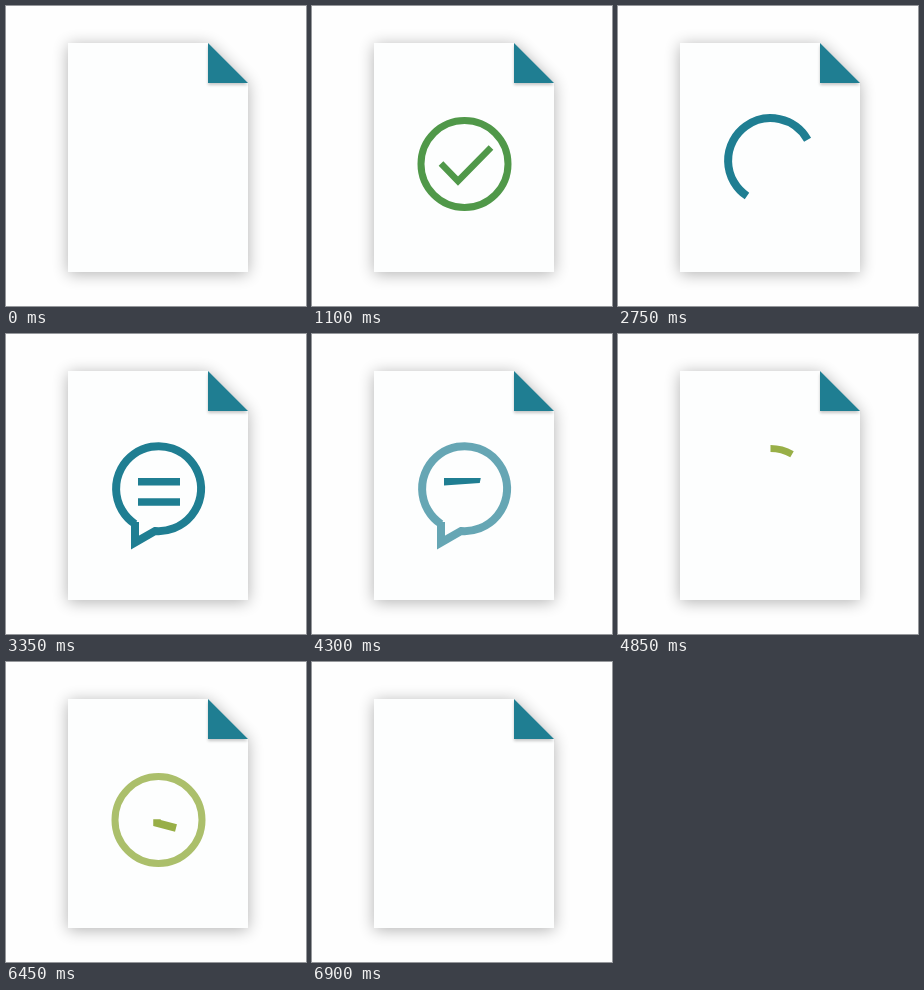
These frames come from a looping animation (300x300 px, 7150 ms). An HTML page:

```html
<!DOCTYPE html>
<html lang="en">
<head>
<meta charset="utf-8">
<title>Document status icons</title>
<style>
  html, body { margin: 0; width: 100%; height: 100%; overflow: hidden; background: #fefefe; }
  svg { display: block; width: 100%; height: 100%; }
  .icon path { fill: none; stroke: currentColor; stroke-miterlimit: 10; }
</style>
</head>
<body>
<svg viewBox="0 0 300 300">
  <defs>
    <filter id="soft" x="-20%" y="-20%" width="140%" height="140%">
      <feGaussianBlur stdDeviation="8"/>
    </filter>
    <filter id="edge" x="-20%" y="-20%" width="140%" height="140%">
      <feGaussianBlur stdDeviation="1.5"/>
    </filter>
  </defs>
  <path d="M62 37H202L242 77V266H62Z" transform="translate(0 2)" fill="#000" opacity=".3" filter="url(#soft)"/>
  <path d="M62 37H202L242 77V266H62Z" fill="#fdfefe"/>
  <path d="M202 37V77H242Z" transform="translate(0 2)" fill="#000" opacity=".22" filter="url(#edge)"/>
  <path d="M202 37V77H242Z" fill="#1f7e92"/>

  <g class="icon" color="#509849">
    <path id="checkRing" d="M152.5 114.5a43.5 43.5 0 0 1 0 87a43.5 43.5 0 0 1 0 -87" stroke-width="7" pathLength="1"/>
    <path id="checkMark" d="M129 157.5L146 175L179 141.5" stroke-width="6.5" pathLength="1"/>
  </g>
  <g class="icon" color="#1f7e92">
    <path id="bubble" d="M129 190A42.5 42.5 0 1 1 149 197L129 208.5V188" stroke-width="8" pathLength="1"/>
    <polygon id="line1" fill="currentColor"/>
    <polygon id="line2" fill="currentColor"/>
  </g>
  <g class="icon" color="#98af47">
    <path id="clockRing" d="M152.5 114.5a43.5 43.5 0 0 1 0 87a43.5 43.5 0 0 1 0 -87" stroke-width="7" pathLength="1"/>
    <path id="hands" d="M151 134V161L170 166" stroke-width="7.5" pathLength="1"/>
  </g>
</svg>
<script>
const LOOP = 7150, STEP = 50;
const $ = id => document.getElementById(id);
const ramp = (t, from, to) => Math.min(1, Math.max(0, (t - from) / (to - from)));
const easeOut = u => 1 - (1 - u) ** 2;
const easeInOut = u => u * u * (3 - 2 * u);

// Shows the part of a path between fractions a and b.
function trim(id, a, b, alpha = 1) {
  const el = $(id);
  el.style.visibility = b - a > 0.001 ? 'visible' : 'hidden';
  el.style.opacity = alpha;
  if (a <= 0 && b >= 1) el.removeAttribute('stroke-dasharray');
  else el.setAttribute('stroke-dasharray', `0 ${a} ${b - a} 2`);
}

// The outline fades while its start chases its end.
function outline(id, t, start, end, out) {
  trim(id, easeOut(ramp(t, out + 230, out + 600)),
    easeInOut(ramp(t, start, end)), 1 - ramp(t, out, out + 700));
}

function mark(id, t, start, end, out) {
  trim(id, easeInOut(ramp(t, out, out + 280)), easeInOut(ramp(t, start, end)));
}

// A text bar grows from the left and tapers off to the left.
function bar(id, y, t, start, out) {
  const grow = easeInOut(ramp(t, start, start + 250));
  const u = ramp(t, out, out + 150);
  const right = 132 + 42 * grow * (1 - u ** 3);
  const low = y + 7.5 - 5 * u;
  $(id).setAttribute('points', `132,${y} ${right},${y} ${right - 2 * u * grow},${low} 132,${y + 7.5}`);
  $(id).style.visibility = grow > 0 && u < 1 ? 'visible' : 'hidden';
}

function draw(t) {
  outline('checkRing', t, 10, 750, 1775);
  mark('checkMark', t, 680, 1100, 1775);

  outline('bubble', t, 2425, 3050, 4075);
  bar('line1', 144, t, 2900, 4225);
  bar('line2', 164.3, t, 3050, 4100);

  outline('clockRing', t, 4775, 5200, 6310);
  mark('hands', t, 5050, 5350, 6310);
}

function tick(now) {
  draw(Math.floor((now % LOOP) / STEP) * STEP);
  requestAnimationFrame(tick);
}

let begin;
draw(0);
requestAnimationFrame(function first(now) {
  begin = now;
  requestAnimationFrame(function run(time) {
    draw(Math.floor(((time - begin) % LOOP) / STEP) * STEP);
    requestAnimationFrame(run);
  });
});
</script>
</body>
</html>
```
